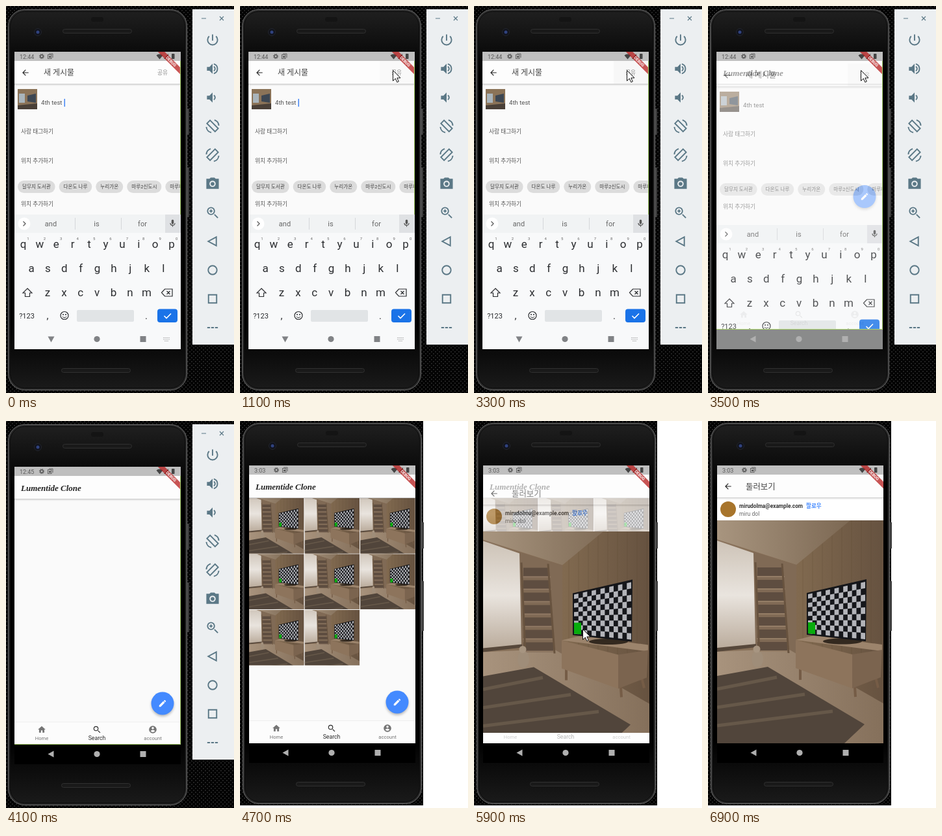
Animation of 351x592 px, one loop 7700 ms. Source, as an HTML page:

```html
<!DOCTYPE html>
<html lang="ko">
<head>
<meta charset="utf-8">
<title>Emulator demo</title>
<style>
html, body { margin: 0; width: 100%; height: 100%; overflow: hidden; background: #fff; }
svg { display: block; }
text { font-family: Roboto, 'Noto Sans CJK KR', 'Noto Sans CJK JP', sans-serif; white-space: pre; }
.script { font: italic bold 13px 'Liberation Serif', serif; }
</style>
</head>
<body>
<svg id="stage" width="351" height="592" viewBox="0 0 351 592"></svg>
<script>
const LOOP = 7700, CUT = 4700, STEP = 100;

// Markup helpers
const rect = (x, y, w, h, fill, more = '') => `<rect x="${x}" y="${y}" width="${w}" height="${h}" fill="${fill}" ${more}/>`;
const circle = (x, y, r, fill, more = '') => `<circle cx="${x}" cy="${y}" r="${r}" fill="${fill}" ${more}/>`;
const oval = (x, y, rx, ry, fill) => `<ellipse cx="${x}" cy="${y}" rx="${rx}" ry="${ry}" fill="${fill}"/>`;
const poly = (points, fill) => `<polygon points="${points}" fill="${fill}"/>`;
const line = (d, color, w = 1, more = '') => `<path d="${d}" fill="none" stroke="${color}" stroke-width="${w}" ${more}/>`;
const text = (x, y, size, fill, s, more = '') => `<text x="${x}" y="${y}" font-size="${size}" fill="${fill}" ${more}>${s}</text>`;
const mid = (x, y, size, fill, s, more = '') => text(x, y, size, fill, s, 'text-anchor="middle" ' + more);
const group = (id, body, more = '') => `<g id="${id}" ${more}>${body}</g>`;
const fade = (id, stops, more = '') => `<linearGradient id="${id}" ${more}>` +
  stops.map((c, i) => `<stop offset="${i / (stops.length - 1)}" stop-color="${c}"/>`).join('') + '</linearGradient>';
const repeat = (n, fn) => Array.from({ length: n }, (_, i) => fn(i)).join('');

// Icons on a 24 unit grid: a filled part and a stroked part
const speaker = 'M3 9H7L12 4V20L7 15H3Z';
const lens = 'M15 15L20.5 20.5M15 9.5A5.5 5.5 0 1 0 4 9.5A5.5 5.5 0 1 0 15 9.5';
const ICON = {
  power: ['', 'M12 3V13M6.5 6A8 8 0 1 0 17.5 6'],
  volUp: [speaker, 'M14 8.5A4 4 0 0 1 14 15.5M14 4.3A8 8 0 0 1 14 19.7'],
  volDown: [speaker, 'M14 8.5A4 4 0 0 1 14 15.5'],
  turn: ['', 'M8 2.5L21 15.5L16 20.5L3 7.5ZM2 13A10 10 0 0 0 10 22M22 11A10 10 0 0 0 15 2'],
  camera: ['M2 4H7L9 2H15L17 4H22V20H2ZM12 7A5 5 0 1 0 12 17A5 5 0 1 0 12 7M12 9A3 3 0 1 1 12 15A3 3 0 1 1 12 9', ''],
  zoom: ['', lens + 'M9.5 7V12M7 9.5H12'],
  triangle: ['', 'M5 12L18 5V19Z'],
  ring: ['', 'M19 12A7 7 0 1 0 5 12A7 7 0 1 0 19 12'],
  square: ['', 'M5.5 5.5H18.5V18.5H5.5Z'],
  dots: ['', 'M3.5 12H8M9.8 12H14.2M16 12H20.5'],
  search: ['', lens],
  home: ['M10 20V14H14V20H19V12H22L12 3L2 12H5V20Z', ''],
  account: ['M12 2A10 10 0 1 0 12 22A10 10 0 1 0 12 2M12 5A3 3 0 1 1 12 11A3 3 0 1 1 12 5M6 16Q12 10 18 16Q12 22 6 16', ''],
  edit: ['M3 17V21H7L18 10L14 6ZM15 5L19 9L21 6L18 3Z', ''],
  back: ['', 'M20 12H5M12.5 4.5L5 12L12.5 19.5'],
  mic: ['M9 5A3 3 0 0 1 15 5V11A3 3 0 0 1 9 11Z', 'M6 11A6 6 0 0 0 18 11M12 17V21']
};
const icon = (name, x, y, size, color) => {
  const [solid, open] = ICON[name];
  return `<g transform="translate(${x - size / 2} ${y - size / 2}) scale(${size / 24})">` +
    `<path d="${solid}" fill="${color}" fill-rule="evenodd"/>${line(open, color, 2)}</g>`;
};

function checker() {
  const cols = 13, rows = 9;
  const at = (c, r) => {
    const u = c / cols, top = 113 - 19 * u;
    return `${140 + 88 * u},${top + (60 + 28 * u) * r / rows}`;
  };
  return repeat(rows * cols, i => {
    const c = i % cols, r = i / cols | 0;
    return i % 2 ? '' : poly(`${at(c, r)} ${at(c + 1, r)} ${at(c + 1, r + 1)} ${at(c, r + 1)}`, '#b3b4b9');
  });
}

const room = () =>
  rect(0, 0, 256, 341, 'url(#wall)') +
  repeat(9, i => line(`M${132 + i * 15} 0V240`, '#55442f', .6, 'opacity=".4"')) +
  poly('0,0 205,0 122,68 0,29', 'url(#ceiling)') +
  poly('56,48 122,68 122,208 56,205', '#806a55') +
  poly('0,31 56,50 59,191 0,198', 'url(#window)') +
  poly('0,195 60,189 60,194 0,201', '#57483b') +
  poly('0,201 108,196 256,280 256,341 0,341', 'url(#floor)') +
  repeat(7, i => rect(62, 72 + i * 19, 40 + i, 15, '#5e4d40') + rect(61, 85 + i * 19, 43 + i, 2, '#947d66')) +
  line('M59 64L65 206M100 66L110 203', '#68533f', 3) +
  poly('0,238 78,224 227,312 196,341 0,341', '#51453b') +
  repeat(3, i => line(`M0 ${258 + i * 28}L${92 + i * 43} ${240 + i * 26}`, '#665849', 5)) +
  oval(62, 212, 9, 13, '#9f8d79') + circle(61, 197, 5.5, '#a79581') +
  line('M128 226V244M212 255L213 270M244 240L248 256', '#755c46', 4) +
  poly('121,183 150,176 254,190 254,200', '#9c846c') +
  poly('121,183 208,205 208,257 121,226', '#8d745c') +
  poly('208,205 254,198 252,240 208,257', '#7b644f') +
  oval(193, 185, 30, 4.5, '#33291f') +
  poly('138,111 230,90 229,185 138,175', '#15161a') + checker() +
  poly('140,156 151,156 151,174 140,173', '#08ac0c');

const vertical = 'x2="0" y2="1"';
const defs = `<defs>
  <pattern id="carbon" width="6" height="6" patternUnits="userSpaceOnUse">${rect(0, 0, 6, 6, '#020202') + rect(0, 0, 2, 2, '#222') + rect(3, 3, 2, 2, '#222')}</pattern>
  ${fade('wall', ['#8b745e', '#80694f', '#665240'])}
  ${fade('ceiling', ['#a8957f', '#7c6853'])}
  ${fade('window', ['#cdc3b7', '#e9e4de', '#b9aa9a'], vertical)}
  ${fade('floor', ['#a8937d', '#85705b'])}
  ${fade('glass', ['#1f1f1f', '#000', '#000', '#000', '#000', '#000', '#1a1a1a'], vertical)}
  <symbol id="room" viewBox="0 0 256 341" preserveAspectRatio="xMidYMid slice">${room()}</symbol>
  <clipPath id="screen"><rect x="13" y="70" width="256" height="455"/></clipPath>
  <filter id="soft" x="-50%" y="-50%" width="200%" height="200%"><feGaussianBlur stdDeviation="2"/></filter>
</defs>`;

const tools = ['power', 'volUp', 'volDown', 'turn', 'turn', 'camera', 'zoom', 'triangle', 'ring', 'square', 'dots'];
const panel = rect(287, 5, 64, 513, '#eceff1') +
  line('M301 19H308M329 16L335 22M335 16L329 22', '#5b7886', 1.2) +
  tools.map((name, i) => {
    const mark = icon(name, 0, 0, 23, '#5b7886');
    return `<g transform="translate(318 ${52 + 44 * i}) scale(${i === 4 ? -1 : 1} 1)">${mark}</g>`;
  }).join('');

const slot = (x, y) => rect(x, y, 106, 6, '#191919', 'rx="3" stroke="#303030"');
const body =
  rect(278, 157, 4, 40, '#3c3c3c') + rect(278, 247, 4, 76, '#3c3c3c') +
  rect(3.5, 5.5, 275, 582, '#2a2a2a', 'rx="25" stroke="#6c6c6c"') +
  rect(6.5, 8.5, 269, 576, 'url(#glass)', 'rx="22" stroke="#0a0a0a"') +
  slot(87.5, 35.5) + slot(85.5, 554.5) + rect(131, 17, 19, 7, '#141414', 'rx="3.5"') +
  circle(49, 40, 5.5, '#11131c', 'stroke="#23252c"') + circle(49, 40, 2.5, '#30427e');

const bar = rect(13, 119, 256, 1, '#000', 'opacity=".2"') + rect(13, 120, 256, 2, '#000', 'opacity=".06"') + rect(13, 84, 256, 35, '#fdfdfd');

function home() {
  const tab = (name, x, label, c, size) => icon(name, x, 472, 14, c) + mid(x, 488, size, c, label);
  return rect(13, 84, 256, 411, '#fafafa') +
    group('grid', repeat(8, i => `<use href="#room" x="${13 + i % 3 * 85.6}" y="${120 + (i / 3 | 0) * 85.5}" width="84.6" height="84.6"/>`)) + bar +
    text(23, 107, 13, '#222', 'Lumentide Clone', 'class="script"') +
    rect(13, 460, 256, 1, '#efefef') + rect(13, 461, 256, 34, '#fcfcfc') +
    tab('home', 55, 'Home', '#757575', 7.6) + tab('search', 140, 'Search', '#2b2b2b', 8.7) + tab('account', 226, 'account', '#757575', 7.6) +
    group('fab', circle(241, 434.5, 17, '#000', 'opacity=".3" filter="url(#soft)"') + circle(241, 432, 17.5, '#448aff') + icon('edit', 241, 432, 14, '#fff'));
}

const detail = rect(13, 84, 256, 411, '#fff') + bar +
  icon('back', 30, 102, 14, '#222') + text(57, 106.5, 12.4, '#444', '둘러보기') +
  circle(30, 137, 12, '#a8752c') +
  text(47, 135, 8.3, '#333', 'mirudolma@example.com', 'font-weight="bold"') +
  text(150, 135, 8.6, '#448aff', '팔로우', 'font-weight="bold"') +
  text(47, 146.5, 8.6, '#666', 'miru dol');

function chips() {
  const em = c => c === ' ' ? .22 : c < 'a' ? .55 : .92;
  let x = 18;
  return ['달무지 도서관', '다온도 나루', '누리가온', '마루2신도시', '마루나래'].map(s => {
    const w = 14 + 7.6 * [...s].reduce((sum, c) => sum + em(c), 0);
    const chip = rect(x, 267, w, 19, '#dcdcdc', 'rx="9.5"') + text(x + 7, 279.3, 7.6, '#444', s);
    x += w + 6;
    return chip;
  }).join('');
}

const post = rect(13, 84, 256, 441, '#fafafa') + bar +
  rect(215, 84, 54, 35, '#000', 'id="hover"') +
  icon('back', 30, 102, 14, '#222') + text(58, 106, 12, '#444', '새 게시물') + text(233, 105, 8.7, '#8a8a8a', '공유') +
  rect(18, 127, 30, 31, '#8b7358') + rect(20, 134, 9, 14, '#a9b4bb') +
  poly('33,137 46,134 46,148 33,146', '#3d4753') + poly('18,152 48,149 48,158 18,158', '#4a4038') +
  text(54, 151, 9.6, '#555', '4th test') + rect(89.5, 142, 1.5, 12, '#4285f4', 'id="caret"') +
  text(23, 195, 8.7, '#555', '사람 태그하기') + text(23, 240, 8.7, '#555', '위치 추가하기') + text(23, 306, 8.7, '#555', '위치 추가하기') +
  chips();

function keyboard() {
  const ink = '#2b2d30', pitch = 25.4;
  const row = (keys, x, y, size = 17, c = ink) => [...keys].map((k, i) => mid(x + i * pitch, y, size, c, k)).join('');
  return rect(13, 319, 256, 206, '#f8f9fa') + rect(13, 319, 256, 28, '#f1f3f4') + rect(245, 319, 24, 28, '#dfe1e4') +
    circle(28, 333, 9.5, '#fff') + line('M26.5 329.5L30 333L26.5 336.5', '#555', 1.2) +
    ['and', 'is', 'for'].map((w, i) => mid(69 + i * 70.5, 337, 11, '#666', w)).join('') +
    line('M106.5 324V342M177.5 324V342', '#d5d7da') + icon('mic', 256.5, 332.5, 14, '#555') +
    row('1234567890', 34, 357.5, 6, '#666') + row('qwertyuiop', 26.5, 370) + row('asdfghjkl', 39, 406.5) + row('zxcvbnm', 64, 443.5) +
    line('M33 432L40 439H36.5V444.5H29.5V439H26Z', ink, 1.2) +
    line('M239.5 438.5L244.5 433H256V444H244.5ZM247.5 436L252.5 441M252.5 436L247.5 441', ink, 1.2) +
    mid(32, 478, 11, ink, '?123') + mid(64, 479, 15, ink, ',') + mid(216, 479, 15, ink, '.') +
    circle(90, 473.5, 6, 'none', `stroke="${ink}" stroke-width="1.2"`) + circle(88, 472, 1, ink) + circle(92, 472, 1, ink) + line('M87 475Q90 479 93 475', ink) +
    rect(109, 465, 88, 18, '#e1e4e6', 'rx="2"') +
    rect(233, 463.5, 31, 20.5, '#1a73e8', 'rx="4"') + line('M243.5 474L247 477.5L254 470.5', '#fff', 1.6);
}

const navBar = rect(13, 495, 256, 30, '#000') + rect(13, 495, 256, 30, '#f8f9fa', 'id="light"') +
  group('keys', '<path id="backKey" d="M64.5 509.5L73.5 504.5V514.5Z"/>' + `<circle cx="140" cy="509.5" r="4.6"/><rect x="206.5" y="505" width="9" height="9"/>`) +
  line('M242 507.5H252M242 510H252M244 512.5H250', '#aaa', 1.2, 'id="kbKey" stroke-dasharray="1.4 .8"');

const status = rect(13, 70, 256, 14, '#bfbfbf') + text(21, 80.5, 9, '#5a5a5a', '', 'id="clock"') +
  circle(55, 77, 2.2, 'none', 'stroke="#555" stroke-width="1.5"') + circle(55, 77, 3.6, 'none', 'stroke="#555" stroke-dasharray="1.4 1.43"') +
  rect(64.5, 74.5, 5.5, 6, 'none', 'stroke="#666"') + line('M66 73H72V79', '#666') + rect(66, 76.5, 3, 2.5, '#555') +
  '<path d="M236.5 81.5L231.5 75.5a7 7 0 0 1 10 0zM250 73V81H243z" fill="#444"/>' + rect(255, 73, 4.5, 8, '#444', 'rx=".8"') +
  '<path d="M233.8 70H244.3L269 94.7V105.2Z" fill="#b71c1c" opacity=".75"/>' +
  mid(0, 2.2, 6.2, '#fff', 'DEBUG', 'font-weight="bold" transform="translate(254.2 84.8) rotate(45)"');

const stage = document.getElementById('stage');
stage.innerHTML = defs + rect(0, 0, 351, 592, 'url(#carbon)') +
  group('blank', rect(282, 0, 69, 592, '#fff') + rect(0, 588, 351, 4, '#fff')) + group('panel', panel) +
  group('phone', body + '<g clip-path="url(#screen)">' +
    home() + group('detail', detail) + '<use id="hero" href="#room" x="13" width="256"/>' +
    group('post', post) + group('kb', keyboard()) + navBar + status +
    group('edge', line('M268.5 84V319', '#a9d46c') + line('M268.5 319V494.5H13', '#a9d46c', 1, 'id="edgeLow"')) + '</g>') +
  '<path id="mouse" d="M.5.5V16.5L4.3 13L6.8 18.6L9.3 17.5L6.8 12H12Z" fill="#fff" stroke="#111"/>';

const el = {};
stage.querySelectorAll('[id]').forEach(n => el[n.id] = n);
const set = (id, attr, v) => el[id].setAttribute(attr, v);
const show = (id, on) => set(id, 'display', on ? 'inline' : 'none');
const move = (id, x, y) => set(id, 'transform', `translate(${x} ${y})`);

const progress = (t, start, end) => Math.min(1, Math.max(0, (t - start) / (end - start)));
const glide = (t, start, end, [x0, y0], [x1, y1]) => {
  const k = 1 - (1 - progress(t, start, end)) ** 1.6;
  return [x0 + (x1 - x0) * k, y0 + (y1 - y0) * k];
};

const SHARE = [235, 98], TILE = [167, 318];
function pointer(t) {
  if (t < 3900) return t >= 100 && glide(t, 100, 700, [78, 69], SHARE);
  if (t < 4800) return t < 4100 && glide(t, 3800, 4000, SHARE, [324, 64]);
  if (t < 6700) return glide(t, 4800, 5500, [24, 262], TILE);
  return t < 6900 && [229, 157];
}

function draw() {
  const t = Math.floor(performance.now() % LOOP / STEP) * STEP;
  const second = t >= CUT;
  const leave = progress(t, 3300, 3600), open = progress(t, 5800, 6000);

  show('blank', second);
  show('grid', second);
  show('panel', !second);
  show('edge', !second);
  show('edgeLow', leave > 0);
  move('phone', second ? 1 : 0, second ? -2 : 0);
  el.clock.textContent = second ? '3:03' : t < 3900 ? '12:44' : '12:45';

  // The post page and the keyboard sink and fade while the button drops
  move('post', 0, 9 * leave ** 2);
  set('post', 'opacity', 1 - leave ** 2);
  move('kb', 0, 36 * leave ** 2);
  set('kb', 'opacity', 1 - leave ** 4);
  move('fab', 0, -175 * (1 - leave ** 4));
  set('light', 'opacity', 1 - leave ** 2);
  show('caret', t < 3300 && Math.floor((t - 240) / 440) % 2);
  set('hover', 'opacity', .025 * progress(t, 900, 1200));
  set('keys', 'fill', leave ? '#b0b0b0' : '#808285');
  set('backKey', 'transform', leave ? '' : 'rotate(-90 69.5 509.5)');
  show('kbKey', !leave);

  // The detail page rises while the photo's crop grows
  move('detail', 0, 22 * (1 - open));
  set('detail', 'opacity', open ** .6);
  show('hero', open > 0);
  set('hero', 'y', 154 + 34 * (1 - open));
  set('hero', 'height', 341 - 66 * (1 - open));

  const spot = pointer(t);
  show('mouse', spot);
  if (spot) move('mouse', ...spot);
  requestAnimationFrame(draw);
}
draw();
</script>
</body>
</html>
```
